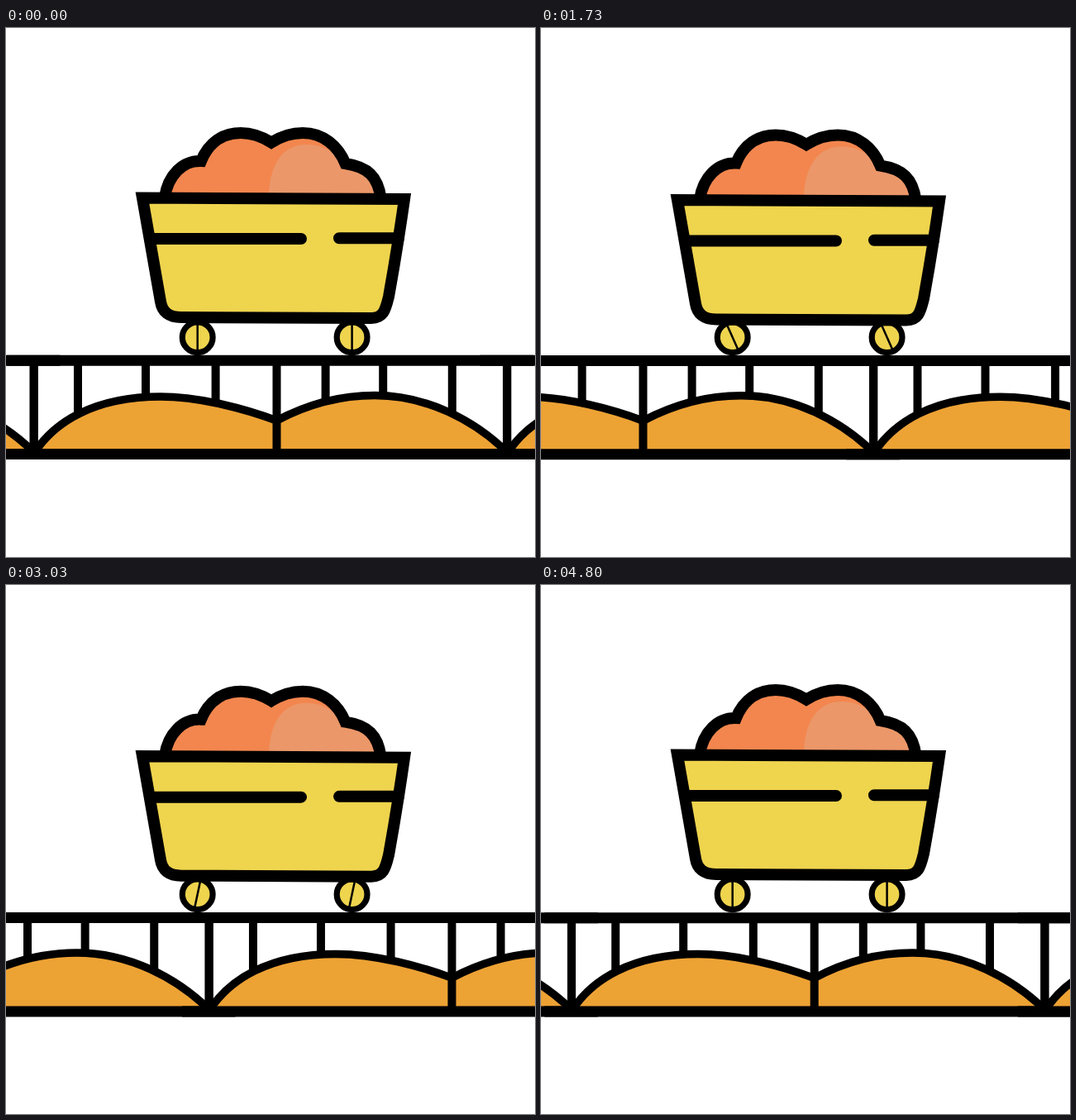
Recreate the animation shown at these times as an HTML page. Size 640 by 640 pixels, loop 4830 ms.

```html
<!DOCTYPE html>
<html lang="en">
<head>
<meta charset="utf-8">
<title>Mine cart</title>
<style>
  html, body { margin: 0; width: 100%; height: 100%; overflow: hidden; background: #fff; }
  svg { display: block; width: 100vw; height: 100vh; }
</style>
</head>
<body>
<svg viewBox="0 0 640 640" fill="none" stroke="#000">
  <defs>
    <g id="span">
      <path fill="#eda234" stroke="none" d="M35 513C58 478 105 446 187 446C235 446 290 461 327.5 475C365 455 405 444.5 446 444.5C510 444.5 567 475 606 513Z"/>
      <path stroke-width="9.5" d="M35 513C58 478 105 446 187 446C235 446 290 461 327.5 475C365 455 405 444.5 446 444.5C510 444.5 567 475 606 513"/>
      <path stroke-width="10" d="M33.7 402V514M87 402V467M169 402V447M253.6 402V453M327.5 402V514M386.6 402V451M456.2 402V445M539.8 402V465M606.2 402V514"/>
      <path stroke-width="13" d="M1 402.2H638M1 515.5H638"/>
    </g>
    <g id="wheel">
      <circle r="18.4" fill="#efd44e" stroke-width="7.2"/>
      <path class="spoke" stroke-width="2.5" d="M0 -16V16"/>
    </g>
  </defs>

  <g id="bridge"></g>

  <g id="wheels"></g>

  <g id="cart" stroke-width="14">
    <path fill="#f3864e" stroke="none" d="M192 205C196 178 214 160 236 161C245 139 262 127 284 127C297 127 309 131 321 138.5C333 131 346 127 359 127C384 127 402 143 410.5 164C438 168 450 180 453.5 206Z"/>
    <path fill="#eb9769" stroke="none" d="M318 206C318 165 335 141 363 141C380 141 395 147 410.5 164C438 168 450 180 453.5 206Z"/>
    <path d="M192 205C196 178 214 160 236 161C245 139 262 127 284 127C297 127 309 131 321 138.5C333 131 346 127 359 127C384 127 402 143 410.5 164C438 168 450 180 453.5 206"/>
    <path fill="#efd44e" d="M165 205.5L187 331Q190 350 212 350L442 351C456 351 459 342 463 325Q473 270 482 207Z"/>
    <path stroke-linecap="round" d="M174 255H357M403 254.2H475"/>
  </g>
</svg>
<script>
const LOOP = 4830, TICK = 1000 / 30;
const SPAN = 572.5, SPEED = 4.744;   // px, px per step
const SPIN = 12;                     // degrees per step
const DIP = 2.5;

// Steps at which the cart is alternately up and down.
const turns = [5.5];
for (let s = 13; s < 100; s += 7.5) turns.push(s);
turns.push(102.5, 107.5);

const $ = id => document.getElementById(id);
const bridge = $('bridge'), cart = $('cart');

bridge.innerHTML = [-1, 0, 1, 2]
  .map(i => `<use href="#span" x="${i * SPAN}"/>`).join('');

const wheelShape = $('wheel');
for (const x of [231.7, 418.6]) {
  const wheel = wheelShape.cloneNode(true);
  wheel.removeAttribute('id');
  wheel.setAttribute('transform', `translate(${x} 374.2)`);
  $('wheels').append(wheel);
}
const spokes = document.querySelectorAll('#wheels .spoke');

function bob(step) {
  const i = turns.findIndex(s => s > step);
  if (i < 1) return 0;
  const p = (step - turns[i - 1]) / (turns[i] - turns[i - 1]);
  const eased = (1 - Math.cos(Math.PI * p)) / 2;
  return DIP * (i % 2 ? eased : 1 - eased);
}

// 25 steps per second, shown on a 30 per second clock.
function stepAt(ms) {
  const tick = Math.floor((ms + 4) / TICK);
  return Math.min(120, Math.ceil((tick * 5 - 3) / 6));
}

function draw(ms) {
  const step = stepAt(ms);
  const sink = 0.6 * step / 120;
  bridge.setAttribute('transform', `translate(${-step * SPEED} ${sink})`);
  cart.setAttribute('transform', `translate(0 ${bob(step)})`);
  spokes.forEach(s => s.setAttribute('transform', `rotate(${step * SPIN})`));
}

const start = performance.now();
function frame() {
  draw((performance.now() - start) % LOOP);
  requestAnimationFrame(frame);
}
frame();
</script>
</body>
</html>
```
